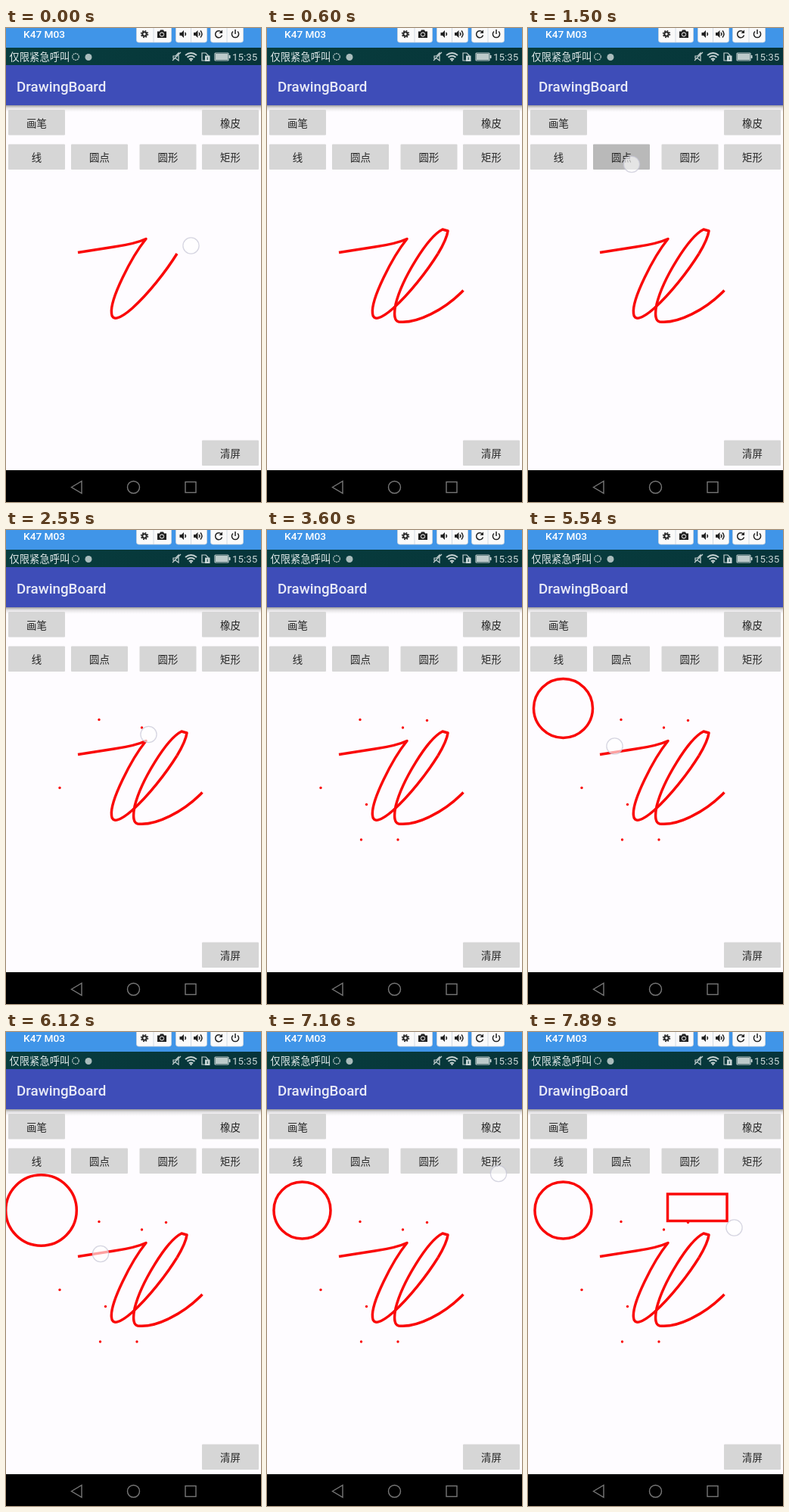
An HTML page for the animation above (8000 ms loop, 337 px wide and 626 px high).

```html
<!DOCTYPE html>
<html lang="zh">
<head>
<meta charset="utf-8">
<title>DrawingBoard</title>
<style>
  html, body { margin: 0; width: 100%; height: 100%; overflow: hidden; background: #fefcff; }
  svg { display: block; width: 337px; height: 626px; }
  text { font-family: Roboto, "Noto Sans CJK SC", "Noto Sans CJK", sans-serif; }
  .key rect { fill: #d6d6d6; }
  .key.down rect { fill: #b9b9b9; }
  .key text { font-size: 13.4px; font-weight: 500; fill: #262626; text-anchor: middle; }
  .ink { fill: none; stroke: #fa0808; stroke-width: 3.5; stroke-linejoin: round; }
  .line { fill: none; stroke: #222; stroke-width: 1.5; }
  .status { fill: none; stroke: #c3d0d0; stroke-width: 1.2; }
  .thick { stroke-width: 2; }
  .nav { fill: none; stroke: #777; stroke-width: 1.4; }
</style>
</head>
<body>
<svg viewBox="0 0 337 626">
  <defs>
    <linearGradient id="sky"><stop offset="0" stop-color="#083e40"/><stop offset=".5" stop-color="#07393b"/><stop offset="1" stop-color="#06343a"/></linearGradient>
    <linearGradient id="shade" x2="0" y2="1"><stop offset="0" stop-color="#777" stop-opacity=".75"/><stop offset=".4" stop-color="#aaa" stop-opacity=".35"/><stop offset="1" stop-color="#ccc" stop-opacity="0"/></linearGradient>
  </defs>
  <rect width="337" height="626" fill="#fefcff"/>

  <!-- window bar -->
  <rect width="337" height="26" fill="#4095e8"/>
  <text x="23" y="13" font-size="13.700" font-weight="500" fill="#fff">K47 M03</text>
  <g fill="#fafafa" stroke="#c9d3dd" stroke-width=".8">
    <rect x="172.500" y="-6" width="46" height="25" rx="3"/>
    <rect x="224.500" y="-6" width="41" height="25" rx="3"/>
    <rect x="270.500" y="-6" width="43" height="25" rx="3"/>
    <path d="M195 0V19M244.500 0V19M292 0V19"/>
  </g>
  <circle cx="183" cy="8" r="2.700" class="line thick"/>
  <circle cx="183" cy="8" r="4.400" class="line" stroke-dasharray="1.800 1.656"/>
  <path d="M200 4.500h3l1-2h4l1 2h3V13h-12z" fill="#222"/>
  <circle cx="206" cy="8.500" r="2.600" fill="#222" stroke="#fafafa"/>
  <path id="horn" d="M229.500 6h2.500l3-3v10l-3-3h-2.500z" fill="#222"/>
  <path d="M236.500 6q2 2 0 4" class="line"/>
  <use href="#horn" x="18.500"/>
  <path d="M255 6q2 2 0 4M257 3.500q4 4.500 0 9" class="line"/>
  <path d="M284.500 5.200A4.500 4.500 0 1 0 285.500 9.500" class="line"/>
  <path d="M286 2.500V7h-4.500z" fill="#222"/>
  <path d="M300 4.500A4.600 4.600 0 1 0 306 4.500M303 2V8" class="line"/>

  <!-- status bar -->
  <rect y="26" width="337" height="24" fill="url(#sky)"/>
  <text x="4.500" y="43" font-size="13.300" fill="#e2eaea">仅限紧急呼叫</text>
  <circle cx="92" cy="38" r="4.300" class="status" stroke-dasharray="2 .700"/>
  <circle cx="109" cy="38.500" r="4.500" fill="#a9bcbc"/>
  <path d="M221 37h3l4-4v10l-4-3h-3zM220 43L231 32" class="status"/>
  <path d="M237 36q7.500-6 15 0M239.500 38.800q5-4 10 0M242 41.500q2.500-2 5 0" class="status thick"/>
  <circle cx="244.500" cy="42.800" r="1.200" fill="#c9d6d6"/>
  <path d="M259 33h5l3 3v7h-8z" class="status"/>
  <rect x="263" y="36.500" width="6.500" height="7.500" fill="#c9d6d6"/>
  <path d="M266.200 38.500v3.500" stroke="#07383b"/>
  <rect x="276" y="33" width="18" height="10" rx="1" class="status"/>
  <rect x="277" y="34" width="16" height="8" fill="#bccaca"/>
  <path d="M295.500 36v4" class="status thick"/>
  <text x="299" y="43" font-size="13.300" fill="#c9d6d6">15:35</text>

  <!-- app bar -->
  <rect y="102" width="337" height="9" fill="url(#shade)"/>
  <rect y="49" width="337" height="53" fill="#3e4db8"/>
  <text x="14" y="84" font-size="18.800" font-weight="500" fill="#e8eaf7">DrawingBoard</text>

  <g id="keys"></g>

  <!-- drawing -->
  <path class="ink" d="M95 296.500L143 289Q171 285 185 278.500C166 302 137 358 139.500 377C140 387 150 385 167 370C188 351 211 322 226 298"/>
  <path id="tail" class="ink" pathLength="100" d="M226 298C232 288 238 276 239 268L232 266C212 276 178 332 170 365C167 380 169 387 174 388C198 391 235 372 259.500 346.500"/>
  <g id="dots" fill="#fa0808"></g>
  <circle id="ring" class="ink" cx="46.500" cy="235.500"/>
  <rect id="box" class="ink" x="184.500" y="214" style="stroke-linejoin:miter"/>
  <circle id="touch" r="10.600" fill="#fff" fill-opacity=".62" stroke="#c4c4d4" stroke-opacity=".7" stroke-width="1.300"/>

  <!-- navigation -->
  <rect y="584" width="337" height="42" fill="#000"/>
  <path d="M86.500 606.500L100 598.500V614.500z" class="nav"/>
  <circle cx="168.500" cy="606.500" r="8" class="nav"/>
  <rect x="237" y="599.500" width="14" height="14" class="nav"/>
</svg>
<script>
const $ = id => document.getElementById(id);
const NS = 'http://www.w3.org/2000/svg';
const LOOP = 8000;

function add(parent, tag, attrs, text = '') {
  const el = document.createElementNS(NS, tag);
  for (const k in attrs) el.setAttribute(k, attrs[k]);
  el.textContent = text;
  return parent.appendChild(el);
}

const keys = {};
function key(label, x, y) {
  const g = keys[label] = add($('keys'), 'g', { class: 'key' });
  add(g, 'rect', { x, y, width: 75, height: 33.5, rx: 1 });
  add(g, 'text', { x: x + 37.5, y: y + 22.5 }, label);
}
key('画笔', 3, 108);
key('橡皮', 259, 108);
['线', '圆点', '圆形', '矩形'].forEach((s, i) => key(s, [3, 86, 176.5, 259][i], 153.5));
key('清屏', 259, 544.5);

const spots = [[71, 340.5], [123, 250.5], [179.5, 261], [211.5, 251.5], [131.5, 362.5], [124.5, 409], [173, 409]];
const dots = spots.map(([cx, cy]) => add($('dots'), 'circle', { cx, cy, r: 1.7 }));

// The touch marker sits slightly below and right of the contact point.
const at = (x, y) => [x + 9, y + 9];
const tap = n => ({ dots: n, touch: at(...spots[n - 1]) });
const grow = r => ({ ring: r, touch: at(46 + r * 1.5, 235 + r * 1.04) });
const off = { touch: null };

// Each step changes only the listed parts.
const steps = [
  [0, { tail: 0, dots: 0, ring: 0, box: null, down: null, touch: [244.5, 287.5] }],
  [150, { tail: 47, touch: [181, 375] }],
  [300, { tail: 77, touch: [224, 386] }],
  [450, { tail: 100, touch: [268, 356] }],
  [600, off],
  [1500, { down: '圆点', touch: [137, 180] }],
  [1650, off],
  [1800, { down: null }],
  [2100, tap(1)], [2250, tap(2)], [2400, off],
  [2550, tap(3)], [2700, tap(4)], [2850, off],
  [3000, tap(5)], [3150, off],
  [3300, tap(6)], [3450, tap(7)], [3600, off],
  [4200, { down: '圆形', touch: [222, 182] }],
  [4350, off],
  [4500, { down: null }],
  [4950, { touch: [54, 243.5] }],
  [5100, grow(6)], [5250, grow(17)], [5400, grow(30)],
  [5540, { ring: 39, touch: [114.5, 285.5] }],
  [5690, grow(43)], [5840, grow(46)], [5980, grow(47.5)],
  [6120, { ring: 46.8, touch: [125, 293] }],
  [6260, grow(43)], [6410, grow(37.5)], [6560, off],
  [7160, { touch: [306, 187] }],
  [7310, off],
  [7750, { box: [30, 14], touch: at(214.5, 228) }],
  [7890, { box: [78.5, 35.5], touch: [272.5, 258.5] }]
];

function stateAt(t) {
  const past = steps.filter(([time]) => time <= t);
  return Object.assign({}, ...past.map(([, change]) => change));
}

function show(el, on) { el.style.display = on ? '' : 'none'; }

function draw(t) {
  const s = stateAt(t);
  $('tail').setAttribute('stroke-dasharray', s.tail + ' 200');
  show($('tail'), s.tail);
  dots.forEach((d, i) => show(d, i < s.dots));
  $('ring').setAttribute('r', s.ring);
  show($('ring'), s.ring);
  show($('box'), s.box);
  if (s.box) {
    $('box').setAttribute('width', s.box[0]);
    $('box').setAttribute('height', s.box[1]);
  }
  for (const k in keys) keys[k].classList.toggle('down', k === s.down);
  show($('touch'), s.touch);
  if (s.touch) $('touch').setAttribute('transform', `translate(${s.touch})`);
}

const start = performance.now();
function tick() {
  draw((performance.now() - start) % LOOP);
  requestAnimationFrame(tick);
}
tick();
</script>
</body>
</html>
```
